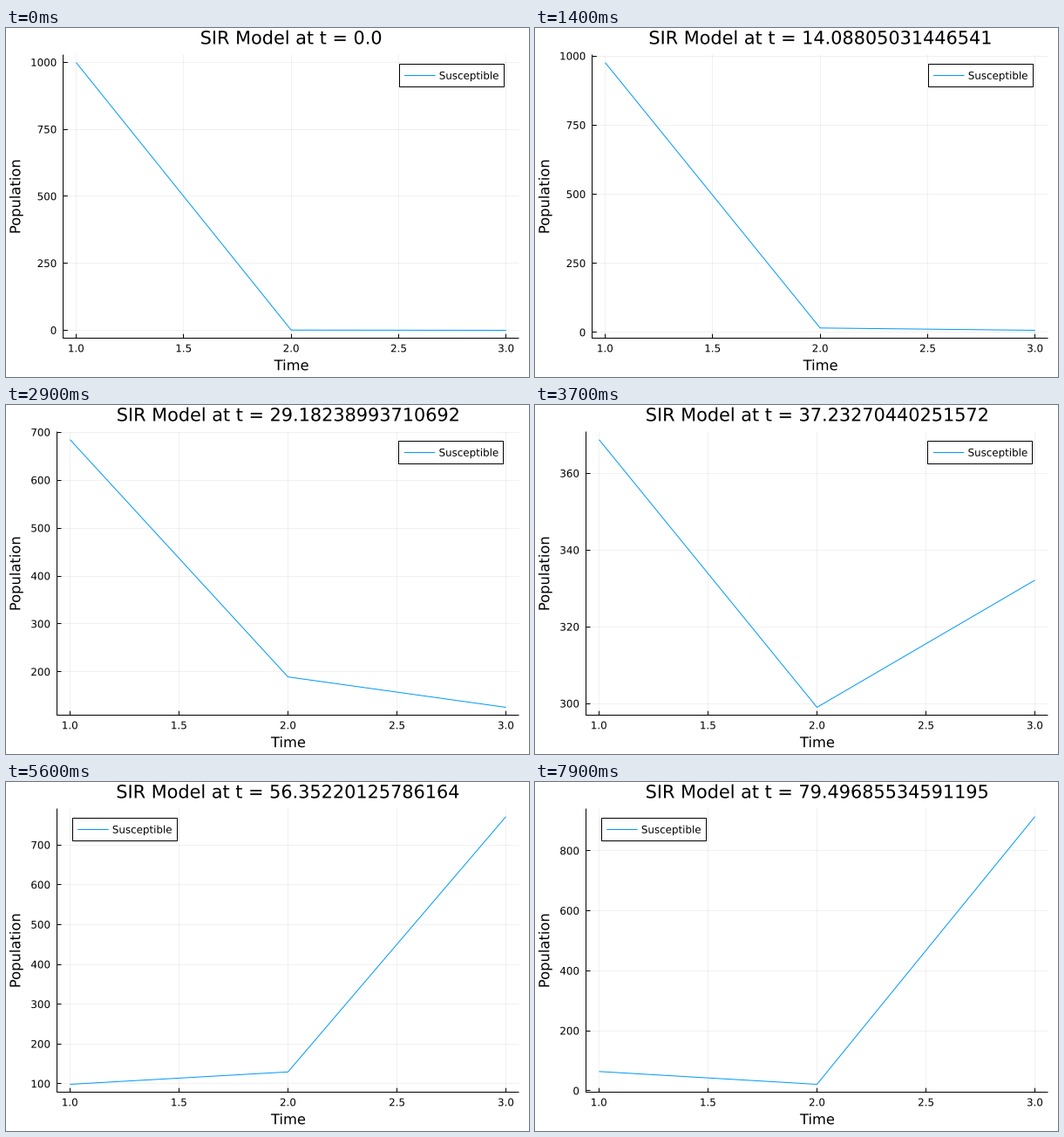
Recreate the animation shown at these times as a matplotlib script. Size 600 px wide and 400 px high, loop 8 s.

```python
import math

import matplotlib.pyplot as plt
import numpy as np
from matplotlib.animation import FuncAnimation
from matplotlib.patches import PathPatch, Rectangle
from matplotlib.textpath import TextPath
from matplotlib.transforms import Affine2D

W, H, DPI = 600, 400, 100
FRAMES, INTERVAL = 80, 100
BETA, GAMMA, POP = 0.3, 0.1, 1000
STEP = 160 / 159
TOP, BOTTOM, RIGHT = 30.5, 355.7, 588.5
TITLE, GUIDE, SMALL = 20.8, 16.33, 11.87  # text heights in px
BLUE = "#009afa"
PX = 72 / DPI

plt.rcParams["font.family"] = "DejaVu Sans"


def slope(u):
    s, i, _ = u
    new, gone = BETA * s * i / POP, GAMMA * i
    return np.array([-new, new - gone, gone])


def simulate(count, sub=20):
    u, h, out = np.array([POP - 1.0, 1.0, 0.0]), STEP / sub, []
    for _ in range(count):
        out.append(u)
        for _ in range(sub):
            a = slope(u)
            b = slope(u + h / 2 * a)
            c = slope(u + h / 2 * b)
            d = slope(u + h * c)
            u = u + h / 6 * (a + 2 * b + 2 * c + d)
    return out


def nice_ticks(lo, hi):
    """Score candidate steps by count, niceness, coverage and zero."""
    span = hi - lo
    best, ticks = -math.inf, []
    top = math.ceil(math.log10(span))
    for z in range(top, top - 3, -1):
        for k in range(4, 17):
            for q, nice in ((1, 1), (5, .9), (2, .7), (2.5, .5), (3, .2)):
                step = q * 10.0 ** z
                reach = (k - 1) * step
                if reach < span:
                    continue
                r = math.ceil((hi - reach) / step)
                while r * step <= lo:
                    vals = [(r + j) * step for j in range(k)]
                    vals = [v for v in vals if lo <= v <= hi]
                    n = len(vals)
                    if 4 <= n <= 8:
                        score = (1 - abs(n - 5) / 5) / 4 + nice / 4
                        score += span / ((n - 1) * step) / 2
                        score += (r <= 0 and -r < k) / 6
                        score -= 1000 * (reach >= 2 * span)
                        if score > best + 1e-9:
                            best, ticks = score, vals
                    r += 1
    return ticks


states = simulate(FRAMES)

fig = plt.figure(figsize=(W / DPI, H / DPI), dpi=DPI, facecolor="white")
ax = fig.add_axes([0, 0, 1, 1])


def crisp(v):
    return math.floor(v) + 0.5


def line(xs, ys, color="black", **kw):
    ax.plot(xs, ys, color=color, lw=PX, solid_capstyle="butt",
            snap=False, **kw)


def hline(x0, x1, y, color="black", **kw):
    line([x0, x1], [crisp(y)] * 2, color, **kw)


def vline(x, y0, y1, **kw):
    line([crisp(x)] * 2, [y0, y1], **kw)


def label(x, y, s, size, align=0.5, angle=0):
    """Text as outlines; align 0, 0.5 or 1 puts left, middle or right at x."""
    path = TextPath((0, 0), s, size=size)
    box = path.get_extents()
    move = Affine2D().translate(-box.x0 - align * box.width, 0)
    move.scale(1, -1).rotate_deg(-angle).translate(x, y)
    ax.add_patch(PathPatch(move.transform_path(path), fc="black", lw=0,
                           snap=False, zorder=5))


def legend(left, on_right):
    inset = (RIGHT - left) / 30
    x = RIGHT - inset - 120 if on_right else left + inset
    y = TOP + (BOTTOM - TOP) / 30
    ax.add_patch(Rectangle((crisp(x), crisp(y)), 120, 26, fc="white",
                           ec="black", lw=PX, snap=False, zorder=4))
    hline(x + 6, x + 41.5, y + 13, BLUE, zorder=5)
    label(x + 46.5, y + 17.3, "Susceptible", SMALL, 0)


def draw(n):
    ax.clear()
    ax.set_xlim(0, W)
    ax.set_ylim(H, 0)
    ax.axis("off")

    u = states[n]
    pad = 0.03 * (u.max() - u.min())
    lo, hi = u.min() - pad, u.max() + pad
    ticks = nice_ticks(lo, hi)
    left = 36.6 + 7.3 * max(len(f"{v:.0f}") for v in ticks)
    mid = (left + RIGHT) / 2

    def px(v):
        return left + (v - 0.94) / 2.12 * (RIGHT - left)

    def py(v):
        return BOTTOM - (v - lo) / (hi - lo) * (BOTTOM - TOP)

    for v in (1, 1.5, 2, 2.5, 3):
        x = px(v)
        vline(x, TOP, BOTTOM, alpha=0.055, zorder=1)
        vline(x, BOTTOM, BOTTOM - 5, zorder=3)
        label(x, 371.3, f"{v:.1f}", SMALL)
    for v in ticks:
        y = py(v)
        hline(left, RIGHT, y, alpha=0.055, zorder=1)
        hline(left, left + 5, y, zorder=3)
        label(left - 8.3, y + 4.3, f"{v:.0f}", SMALL, 1)

    vline(left, TOP, crisp(BOTTOM) + 0.5, zorder=3)
    hline(crisp(left) - 0.5, RIGHT, BOTTOM, zorder=3)
    line([px(v) for v in (1, 2, 3)], py(u), BLUE, zorder=2)

    legend(left, (u[2] - lo) / (hi - lo) < 0.75)
    label(mid, 18.4, f"SIR Model at t = {160 * n / 159}", TITLE)
    label(mid, 392.2, "Time", GUIDE)
    label(16.3, (TOP + BOTTOM) / 2, "Population", GUIDE, angle=90)


anim = FuncAnimation(fig, draw, frames=FRAMES, interval=INTERVAL,
                     init_func=lambda: [], repeat=True, repeat_delay=0)
plt.show()
```
